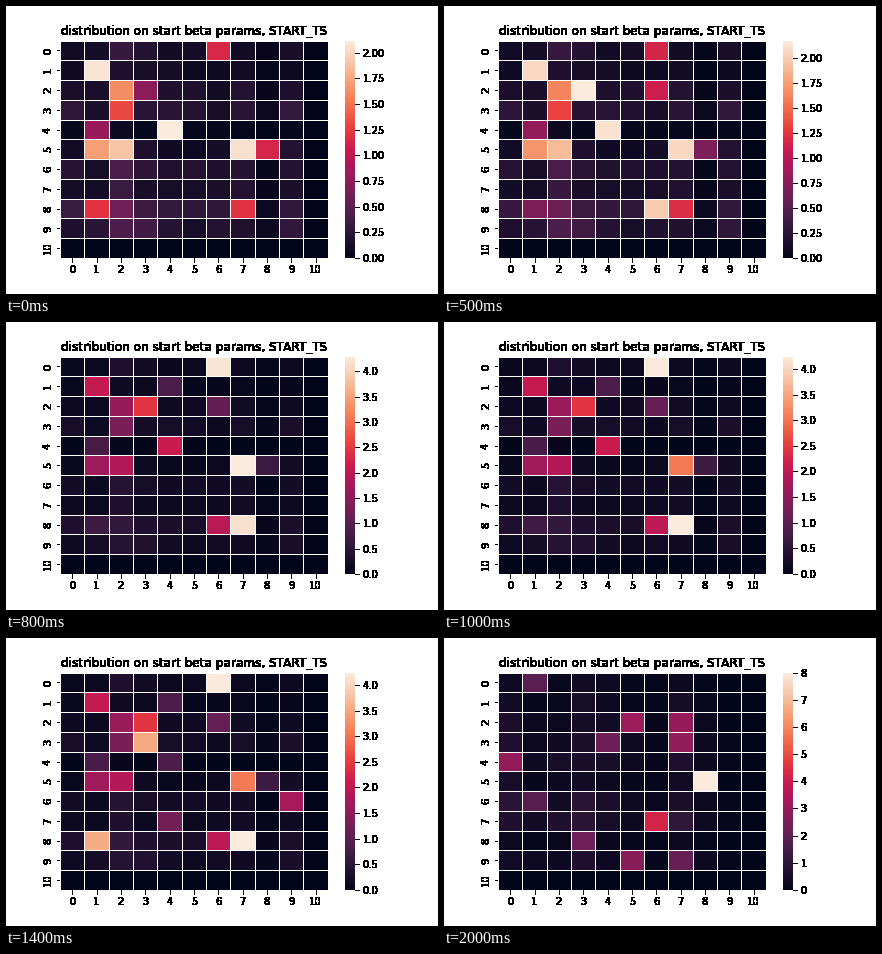
Animation, 432 px wide and 288 px high, one loop 2100 ms. Source, as a matplotlib script:

```python
import numpy as np
import matplotlib.pyplot as plt
from matplotlib.animation import FuncAnimation
from matplotlib.colors import LinearSegmentedColormap

N = 11
FRAMES, STEP_MS = 21, 100

ROCKET = LinearSegmentedColormap.from_list("rocket", [
    (0, "#03051a"), (.143, "#35193e"), (.2, "#4c1d4b"), (.25, "#611f53"),
    (.286, "#701f57"), (.4, "#a11a5b"), (.429, "#ad1759"), (.5, "#cb1b4f"),
    (.571, "#e13342"), (.6, "#e83f3f"), (.714, "#f37651"), (.75, "#f4875e"),
    (.8, "#f69c73"), (.857, "#f6b48f"), (1, "#faebdd")])

# Peaks as {(row, column): height}
START_PEAKS = {
    (0, 6): 1.14, (1, 1): 2.07, (2, 2): 1.62, (2, 3): .74, (3, 2): 1.31,
    (4, 1): .8, (4, 4): 2.118, (5, 1): 1.7, (5, 2): 1.9, (5, 7): 2.06,
    (5, 8): 1.12, (8, 1): 1.2, (8, 7): 1.2}
FINAL_PEAKS = {
    (0, 1): 1.9, (2, 5): 3.1, (2, 7): 3, (3, 4): 2.2, (3, 7): 2.9,
    (4, 0): 2.95, (5, 8): 8, (6, 1): 1.8, (7, 6): 4.2, (8, 3): 2.25,
    (9, 5): 2.7, (9, 7): 2.1}

# Peaks that move, by step
MOVES = {
    1: {(5, 8): .68},
    2: {(8, 1): .7, (8, 6): 1.98},
    4: {(2, 3): 2.174},
    5: {(2, 6): 1.1},
    6: {(5, 7): 4.295},
    7: {(0, 6): 4.22, (1, 4): .85},
    8: {(8, 7): 4.17, (2, 3): 2.45},
    9: {(5, 7): 3.05},
    10: {(8, 7): 4.24},
    11: {(8, 1): 3.55},
    12: {(6, 9): 2.35},
    13: {(3, 3): 3.5, (4, 4): .85},
    14: {(7, 4): 1.25, (6, 9): 1.75},
    15: {(8, 7): 4.46, (0, 2): .7, (2, 9): .7},
}


def haze(rows, cols, seed):
    """Faint background: row strength times column strength, roughened."""
    rough = np.random.default_rng(seed).uniform(.6, 1.3, (N, N))
    return np.outer(rows, cols) * rough


def place(grid, peaks):
    for cell, height in peaks.items():
        grid[cell] = height


START = haze([.5, .3, .6, .7, .1, .4, .6, .5, 1, .8, 0],
             [.3, .3, .55, .4, .3, .25, .25, .3, .07, .4, 0], 3)
FINAL = haze([.4, .5, .7, .8, .8, .5, .9, 1, .3, .6, 0],
             [.9, .4, .5, .8, .6, .3, .2, .8, .3, .1, 0], 8)
place(START, START_PEAKS)
place(FINAL, FINAL_PEAKS)


def state(i):
    if i == FRAMES - 1:
        return FINAL
    grid = START.copy()
    for step, peaks in MOVES.items():
        if step <= i:
            place(grid, peaks)
    return grid


def harden(img, dpi):
    """Turn soft text edges into solid black pixels."""
    out = np.zeros_like(img)
    out[..., 3] = img[..., 3] > 0
    return out, 0, 0


plt.rcParams.update({"font.family": "DejaVu Sans", "font.size": 10})
fig, ax = plt.subplots(figsize=(6, 4), dpi=72, facecolor="white")
fig.subplots_adjust(left=.125, right=.9, bottom=.125, top=.88)

mesh = ax.pcolormesh(START, cmap=ROCKET, vmin=0, vmax=START.max(),
                     edgecolors="white", linewidth=.5)
ax.set(xlim=(0, N), ylim=(N, 0), axisbelow=True)
ax.set_xticks(np.arange(N) + .5, range(N))
ax.set_yticks(np.arange(N) + .5, range(N), rotation=90, va="center")
ax.spines[:].set_visible(False)
title = ax.set_title("distribution on start beta params, START_TS")

bar = fig.colorbar(mesh, ax=ax)
bar.outline.set_linewidth(0)
for part in (title, ax.xaxis, ax.yaxis, bar.ax.yaxis):
    part.set_agg_filter(harden)


def update(i):
    grid = state(i)
    mesh.set_array(grid)
    mesh.set_clim(0, grid.max())
    return [mesh]


anim = FuncAnimation(fig, update, frames=FRAMES, interval=STEP_MS,
                     repeat=True, repeat_delay=0, blit=False)
plt.show()
```
